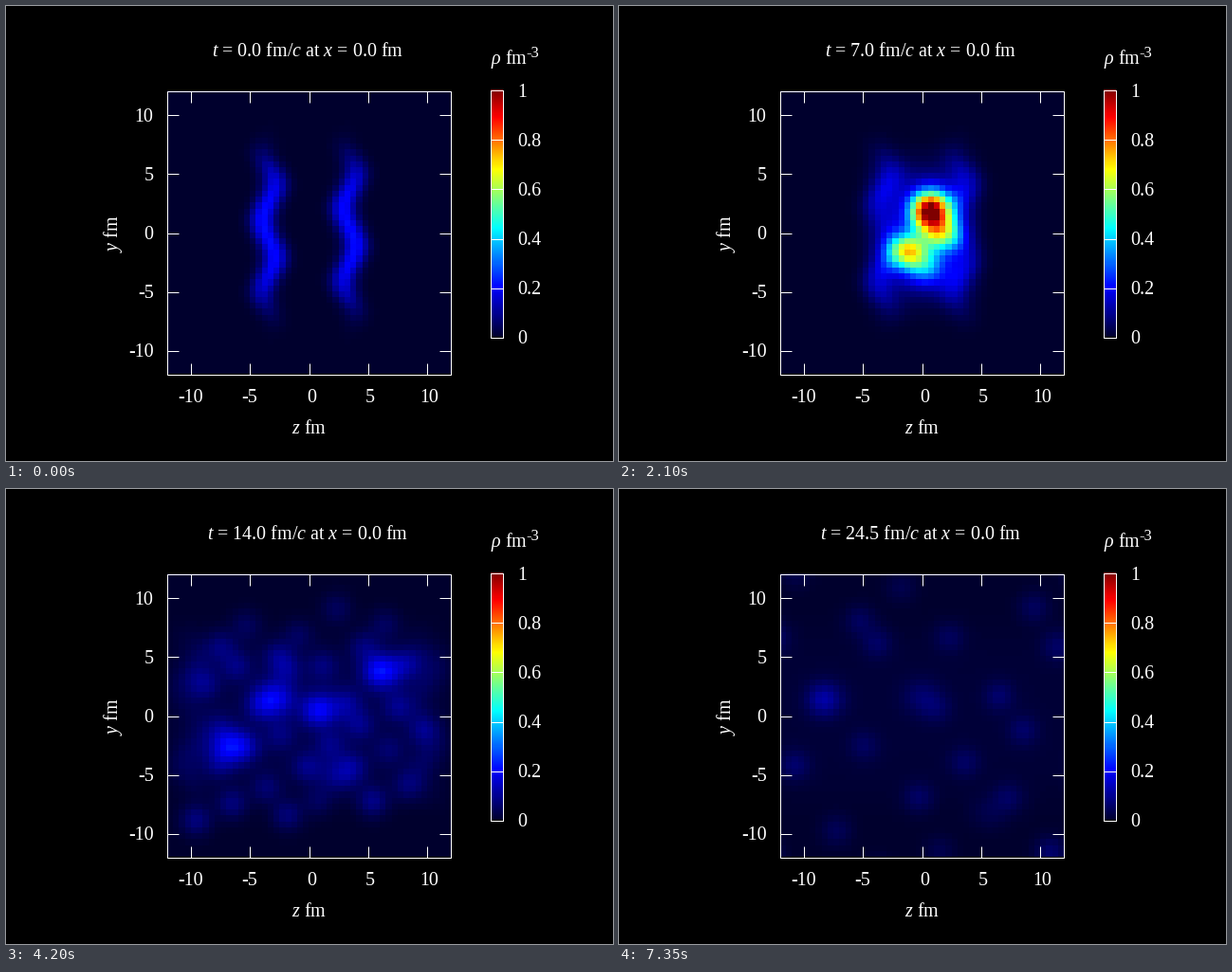
These frames come from a looping animation (640x480 px, 7.5 s). A matplotlib script:

```python
import numpy as np
import matplotlib.pyplot as plt
from matplotlib.animation import FuncAnimation
from matplotlib.colors import LinearSegmentedColormap
from matplotlib.patches import Rectangle

plt.rcParams.update({
    "font.family": "Liberation Serif",
    "mathtext.fontset": "custom",
    "mathtext.rm": "Liberation Serif",
    "mathtext.it": "Liberation Serif:italic",
})

W, H, DPI = 640, 480, 100
FRAMES, STEP_MS, DT = 50, 150, 0.5
LEFT, RIGHT, TOP, BOTTOM = 169.5, 468.5, 89.5, 388.5
BAR_L, BAR_R, BAR_T, BAR_B = 510.5, 523.5, 88.5, 349.5
SCALE = (RIGHT - LEFT) / 24
CX, CY = (LEFT + RIGHT) / 2, (TOP + BOTTOM) / 2

PALETTE = LinearSegmentedColormap.from_list("density", [
    (0, (0, 0, 0.18)), (0.2, (0, 0, 1)), (0.44, (0, 1, 1)),
    (0.68, (1, 1, 0)), (0.89, (1, 0, 0)), (1, (0.5, 0, 0)),
], N=512)

GRID = np.arange(-11.75, 12, 0.5)
Z, Y = np.meshgrid(GRID, GRID)
MEET, SPEED = 3.6, 0.95  # time and speed of the two nuclei

# Hot lumps: start z, y, velocity z, y, weight
LUMPS = [(0.6, 1.4, -0.5, 0, 1), (1.7, -0.2, -0.1, 0.1, 0.8),
         (0.8, 2.3, 0.8, 0.2, 0.9), (-1.2, -1.6, -0.8, -0.15, 1.05),
         (0.4, -3, 0.3, -0.3, 0.45)]

# Fragments spread evenly over direction, with some jitter
rng = np.random.default_rng(4)
N_FRAG = 34
FRAG_VZ = np.linspace(-0.9, 0.9, N_FRAG) + rng.normal(0, 0.03, N_FRAG)
FRAG_VY = (np.arange(N_FRAG) * 0.618) % 1 - 0.5 + rng.normal(0, 0.03, N_FRAG)
FRAG_AMP = rng.uniform(0.5, 1.1, N_FRAG)


def key(t, times, values):
    return np.interp(t, times, values)


def blob(z, y, sz=0.9, sy=0.9):
    return np.exp(-((Z - z) / sz) ** 2 / 2 - ((Y - y) / sy) ** 2 / 2)


def nucleus(t, side):
    """Thin wavy disc that flies through the centre and fades."""
    amp = key(t, [0, 3, 7, 9, 14, 18], [.21, .2, .15, .11, .05, .02])
    hollow = key(t, [4, 7], [0, .6])
    z = side * SPEED * (t - MEET) - 0.5 * np.cos(Y - 1.5 + side / 2)
    profile = np.exp(-(Y / 6.3) ** 4) * (1 - hollow * np.exp(-(Y / 3) ** 2))
    return amp * profile * np.exp(-((Z - z) / (0.75 + 0.02 * t)) ** 2 / 2)


def core(t):
    """Compressed matter at the moment of overlap."""
    amp = key(t, [1.4, 3, 4, 7], [0, 1.8, 1.7, 0])
    width = 1.58 + 0.15 * max(t - 3, 0)
    q = ((Z - 0.15) / width) ** 2 + ((Y - 0.9) / 5.2) ** 2
    return amp * np.exp(-q ** 1.4)


def haze(t):
    amp = key(t, [3, 7, 9, 14, 18], [0, .11, .06, .025, .01])
    reach = SPEED * abs(t - MEET) + 1
    return amp * np.exp(-(Z / reach) ** 4 - (Y / (5 + t / 10)) ** 4)


def lumps(t):
    amp = key(t, [3, 7, 9, 14, 18, 24.5], [0, .54, .36, .16, .11, .06])
    dt = max(t - 7, 0)
    return amp * sum(w * blob(z + vz * dt, y + vy * dt, 1.15, 1.05)
                     for z, y, vz, vy, w in LUMPS)


def fragments(t):
    amp = key(t, [8, 13, 18, 24.5], [0, .08, .065, .055])
    return amp * sum(a * blob(vz * (t - MEET), vy * (t + 4))
                     for vz, vy, a in zip(FRAG_VZ, FRAG_VY, FRAG_AMP))


def field(t):
    return (nucleus(t, -1) + nucleus(t, 1) + core(t) + haze(t) + lumps(t)
            + fragments(t))


fig = plt.figure(figsize=(W / DPI, H / DPI), dpi=DPI, facecolor="black")
ax = fig.add_axes([0, 0, 1, 1])
ax.axis("off")


def label(x, y, text, ha="center", px=20, **kw):
    return ax.text(x, y, text, ha=ha, va="baseline", color="white",
                   fontsize=px * 72 / DPI, **kw)


def line(xs, ys):
    ax.plot(xs, ys, color="white", lw=0.72, solid_capstyle="butt", zorder=3)


def frame(left, right, top, bottom):
    ax.add_patch(Rectangle((left, top), right - left, bottom - top, fill=False,
                           ec="white", lw=0.72, zorder=4))


def picture(data, left, right, top, bottom):
    return ax.imshow(data, cmap=PALETTE, vmin=0, vmax=1, origin="lower",
                     extent=(left, right, bottom, top),
                     interpolation="nearest", aspect="auto")


heat = picture(field(0), LEFT, RIGHT, TOP, BOTTOM)
picture(np.linspace(0, 1, 256)[:, None], BAR_L, BAR_R, BAR_T, BAR_B)
ax.set_xlim(0, W)
ax.set_ylim(H, 0)

frame(LEFT, RIGHT, TOP, BOTTOM)
for v in range(-10, 11, 5):
    x, y = np.floor(CX + v * SCALE) + .5, np.floor(CY - v * SCALE) + .5
    for edge, inner in ((TOP, TOP + 12), (BOTTOM, BOTTOM - 12)):
        line([x, x], [edge, inner])
    for edge, inner in ((LEFT, LEFT + 12), (RIGHT, RIGHT - 12)):
        line([edge, inner], [y, y])
    label(x + (2.5 if v >= 0 else 0), 418, str(v))
    label(155.5, y + 7, str(v), ha="right")

frame(BAR_L, BAR_R, BAR_T, BAR_B)
for v in np.arange(0, 1.1, 0.2):
    y = np.floor(BAR_B - v * (BAR_B - BAR_T)) + .5
    line([BAR_L, BAR_R], [y, y])
    label(539.5, y + 7, f"{v:.1g}", ha="left")

label(319, 451, "$z$ fm")
label(118, 240, "$y$ fm", rotation=90, rotation_mode="anchor")
label(511, 61.5, r"$\rho$ fm", ha="left")
label(548.5, 53.5, "-3", ha="left", px=16.5)
title = label(318.5, 53, "")


def update(i):
    t = i * DT
    heat.set_data(field(t))
    title.set_text(f"$t$ = {t:.1f} fm/$c$ at $x$ = 0.0 fm")
    return heat, title


anim = FuncAnimation(fig, update, frames=FRAMES, interval=STEP_MS,
                     repeat=True, repeat_delay=0, blit=False)
plt.show()
```
